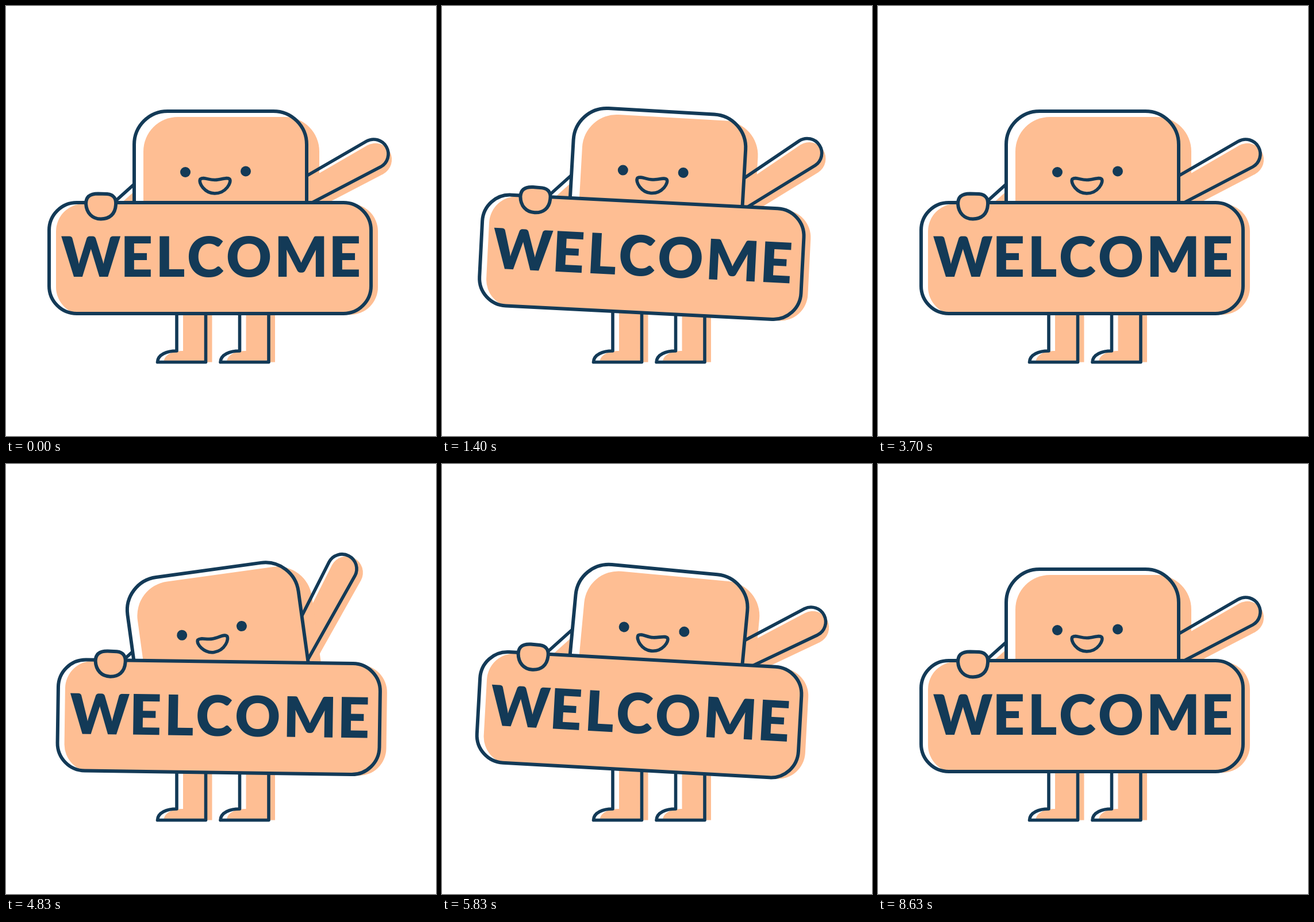
Animation, 748 px wide and 748 px high, one loop 8660 ms. Source, as an HTML page with a canvas:

```html
<!DOCTYPE html>
<html lang="en">
<head>
<meta charset="utf-8">
<title>Welcome</title>
<style>
  html, body { margin: 0; height: 100%; overflow: hidden; background: #fff; }
  canvas { display: block; width: 748px; height: 748px; }
</style>
</head>
<body>
<canvas id="stage" width="748" height="748"></canvas>
<script>
const ctx = document.getElementById('stage').getContext('2d');
const NAVY = '#133a57', PEACH = '#febe93', PERIOD = 4330, RAD = Math.PI / 180;

// Pose: body tilt, sign x, y, tilt, shoulder x, y, arm angle
const REST = [0, 355, 438.5, 0, 499.3, 334.6, -28.8];
const LEFT = [-10.8, 376, 441, 1.12, 513, 319.5, -74.5];
const RIGHT = [7.6, 338.5, 435.5, 3.45, 497, 350, -20];
const KEYS = [[0, REST], [850, LEFT], [1735, RIGHT], [2430, REST], [PERIOD, REST]];

// Ink centre of each letter, relative to the sign
const LETTERS = [['W', -207], ['E', -126], ['L', -66.5], ['C', -7], ['O', 67.5], ['M', 158.5], ['E', 236]];

const MOUTH = new Path2D('M338 301C344 297 353 303 364 302.5C375 302 385 297 389 301' +
  'C393 306 383 326 363 326C346 326 334 308 338 301Z');
const HAND = new Path2D('M139 344C139 332 146 326.5 160 326.5L176 327C188 328 192 336 191 346' +
  'C190 362 180 370.5 165 370.5C150 370.5 140 360 139 344Z');
const LEG = new Path2D('M297 500V600C280 600 264 606 263.5 619.5H347.5V500');

function ease(x) {
  const u = x ** 0.8;
  return u * u * (3 - 2 * u);
}

function poseAt(t) {
  const i = KEYS.findIndex((k, n) => n && t < k[0]);
  const [t0, a] = KEYS[i - 1], [t1, b] = KEYS[i];
  const p = ease((t - t0) / (t1 - t0));
  return a.map((v, n) => v + (b[n] - v) * p);
}

// Run draw() in a moved and turned frame
function at(x, y, angle, draw) {
  ctx.save();
  ctx.translate(x, y);
  ctx.rotate(angle * RAD);
  draw();
  ctx.restore();
}

function fill(path, color, dx = 0, dy = 0) {
  ctx.save();
  ctx.translate(dx, dy);
  ctx.fillStyle = color;
  ctx.fill(path);
  ctx.restore();
}

function stroke(path, width = 6) {
  ctx.lineWidth = width;
  ctx.stroke(path);
}

function box(w, h, r) {
  const p = new Path2D();
  p.roundRect(-w, -h, 2 * w, 2 * h, r);
  return p;
}

function armPath(grow) {
  const p = new Path2D(), r = 25.5 + grow, base = 21.3 + grow;
  p.moveTo(-30, -base);
  p.lineTo(160, -r);
  p.arc(160, 0, r, -Math.PI / 2, Math.PI / 2);
  p.lineTo(-30, base);
  return p;
}

const ARM = armPath(0), ARM_FILL = armPath(3);
const BODY = box(150, 153, 58), BODY_FILL = box(153, 156, 60);
const SIGN = box(280, 96.5, 48);
const SLEEVE = new Path2D('M32 -2L92 -56V10H20Z');
const SLEEVE_LINE = new Path2D('M20 -3.8L80 -57.8');

// Offset colour plus outline; the inside hides whatever lies behind
function panel(outline, color, dx, dy) {
  fill(outline, '#fff');
  ctx.save();
  ctx.clip(outline);
  fill(color, PEACH, dx, dy);
  ctx.restore();
  stroke(outline);
}

function drawLegs() {
  for (const x of [0, 109.5]) {
    at(x, 0, 0, () => {
      fill(LEG, PEACH, 11, 0);
      stroke(LEG, 5.6);
    });
  }
}

function drawFace() {
  at(-373, -336, 0, () => {
    ctx.fillStyle = NAVY;
    for (const [x, y] of [[312, 289], [417, 287.5]]) {
      ctx.beginPath();
      ctx.arc(x, y, 9, 0, 7);
      ctx.fill();
    }
    stroke(MOUTH, 5.6);
  });
}

function drawText() {
  ctx.font = '900 97px Lato, "Open Sans", sans-serif';
  ctx.fillStyle = NAVY;
  for (const [c, x] of LETTERS) {
    const m = ctx.measureText(c);
    ctx.fillText(c, x + (m.actualBoundingBoxLeft - m.actualBoundingBoxRight) / 2, 32.5);
  }
}

function draw(t) {
  const [tilt, sx, sy, turn, ax, ay, wave] = poseAt(t);
  const c = Math.cos(turn * RAD), s = Math.sin(turn * RAD);
  const hx = sx - 190 * c + 90.5 * s, hy = sy - 190 * s - 90.5 * c;

  ctx.fillStyle = '#fff';
  ctx.fillRect(0, 0, 748, 748);
  ctx.strokeStyle = NAVY;
  ctx.lineJoin = ctx.lineCap = 'round';

  drawLegs();
  at(ax, ay, wave, () => fill(ARM_FILL, PEACH, -2, 10));
  at(hx, hy, 0, () => fill(SLEEVE, PEACH));
  at(373, 336, tilt, () => fill(BODY_FILL, PEACH, 19, 13));
  at(ax, ay, wave, () => stroke(ARM, 5.6));
  at(hx, hy, 0, () => stroke(SLEEVE_LINE, 5.6));
  at(373, 336, tilt, () => {
    panel(BODY, BODY_FILL, 19, 13);
    drawFace();
  });
  at(sx, sy, turn, () => {
    fill(SIGN, PEACH, 12, 2);
    panel(SIGN, SIGN, 12, 2);
    drawText();
    ctx.translate(-355, -438.5);
    fill(HAND, PEACH);
    stroke(HAND);
  });
}

function frame() {
  draw(performance.now() % PERIOD);
  requestAnimationFrame(frame);
}
frame();
</script>
</body>
</html>
```
